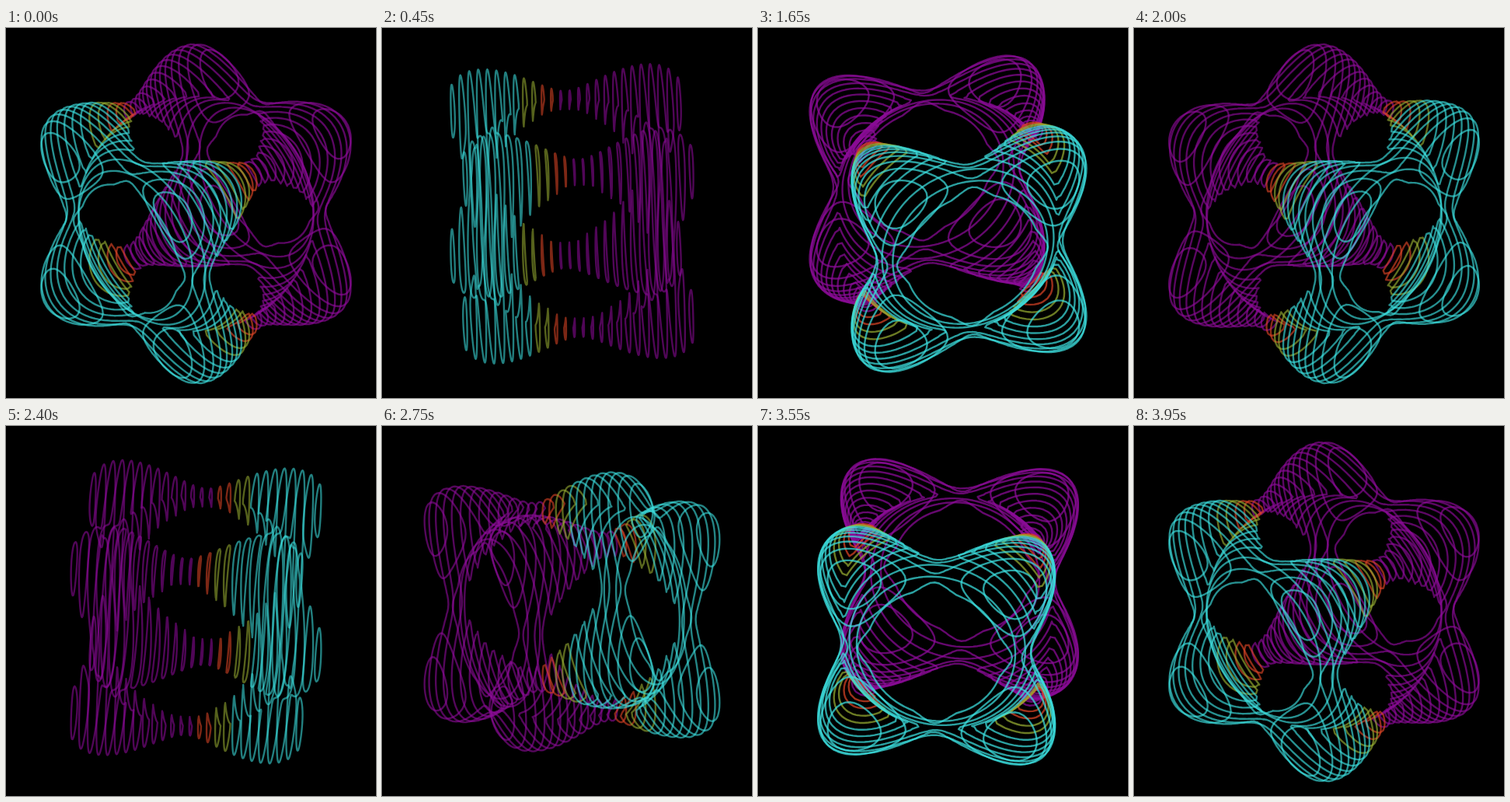
An HTML page with a canvas that plays this animation: 476 px wide and 476 px high, repeating every 4 s.

```html
<!DOCTYPE html>
<html lang="en">
<head>
<meta charset="utf-8">
<title>Sliced surface</title>
<style>
  html, body { margin: 0; width: 100%; height: 100%; overflow: hidden; background: #000; }
  canvas { display: block; width: 476px; height: 476px; }
</style>
</head>
<body>
<canvas id="stage" width="476" height="476"></canvas>
<script>
const ctx = document.getElementById('stage').getContext('2d');
const SIZE = 476, CX = 244.5, CY = 239, SCALE = 67.7;
const FRAME_MS = 50, FRAMES = 80;
const RANGE = 2.5, LEVELS = 30, CELLS = 60;
const RAD = Math.PI / 180;
const CYAN = '60,222,222', OLIVE = '150,172,50', RED = '218,68,38', PURPLE = '140,12,152';

const spread = (i, steps) => -RANGE + 2 * RANGE * i / steps;
const bowl = v => (v * v - 2.5) ** 2;

// Eight joined blobs with a ball scooped out of the middle; negative inside
function field(x, y, z) {
  const blobs = bowl(x) + bowl(y) + bowl(z) - 6.95;
  const ball = 5 - x * x - y * y - z * z;
  return Math.max(blobs, ball);
}

// Marching squares: segments [x1, y1, x2, y2] of the surface cut at height z
function slice(z) {
  const segments = [];
  for (let i = 0; i < CELLS; i++) {
    for (let j = 0; j < CELLS; j++) {
      const corners = [[i, j], [i + 1, j], [i + 1, j + 1], [i, j + 1]].map(([a, b]) => {
        const x = spread(a, CELLS), y = spread(b, CELLS);
        return [x, y, field(x, y, z)];
      });
      const hits = [];
      corners.forEach((p, n) => {
        const q = corners[(n + 1) % 4];
        if ((p[2] < 0) === (q[2] < 0)) return;
        const t = p[2] / (p[2] - q[2]);
        hits.push([p[0] + t * (q[0] - p[0]), p[1] + t * (q[1] - p[1])]);
      });
      if (hits.length === 4) {
        // Ambiguous cell: the mean decides which corners are joined
        const mean = corners.reduce((sum, c) => sum + c[2], 0);
        if ((mean < 0) !== (corners[0][2] < 0)) hits.push(hits.shift());
      }
      for (let n = 0; n + 1 < hits.length; n += 2) segments.push([...hits[n], ...hits[n + 1]]);
    }
  }
  return segments;
}

const slices = [];
for (let k = LEVELS - 1; k >= 0; k--) {
  const z = spread(k, LEVELS - 1), segments = slice(z);
  if (!segments.length) continue;
  const n = slices.length;
  slices.push({ z, segments, rgb: n < 8 ? CYAN : n < 10 ? OLIVE : n < 12 ? RED : PURPLE });
}
slices.reverse();

function draw(turn) {
  const yaw = (-44.5 - 360 * turn) * RAD;
  const tilt = Math.atan(0.6 * Math.cos(2 * Math.PI * turn));
  const cosY = Math.cos(yaw), sinY = Math.sin(yaw);
  const cosT = Math.cos(tilt), sinT = Math.sin(tilt);
  const alpha = 0.57 + 0.16 * cosY * cosY;

  ctx.fillStyle = '#000';
  ctx.fillRect(0, 0, SIZE, SIZE);
  ctx.lineWidth = 2.4;
  ctx.lineCap = 'round';

  for (const { z, segments, rgb } of slices) {
    const px = x => CX + SCALE * (x * cosY + z * sinY);
    const py = (x, y) => CY - SCALE * (y * cosT - (z * cosY - x * sinY) * sinT);
    ctx.beginPath();
    for (const [x1, y1, x2, y2] of segments) {
      ctx.moveTo(px(x1), py(x1, y1));
      ctx.lineTo(px(x2), py(x2, y2));
    }
    ctx.strokeStyle = `rgba(${rgb},${alpha})`;
    ctx.stroke();
  }
}

let shown = -1;
function tick() {
  const frame = Math.floor(performance.now() / FRAME_MS) % FRAMES;
  if (frame !== shown) draw((shown = frame) / (FRAMES - 1));
  requestAnimationFrame(tick);
}
tick();
</script>
</body>
</html>
```
